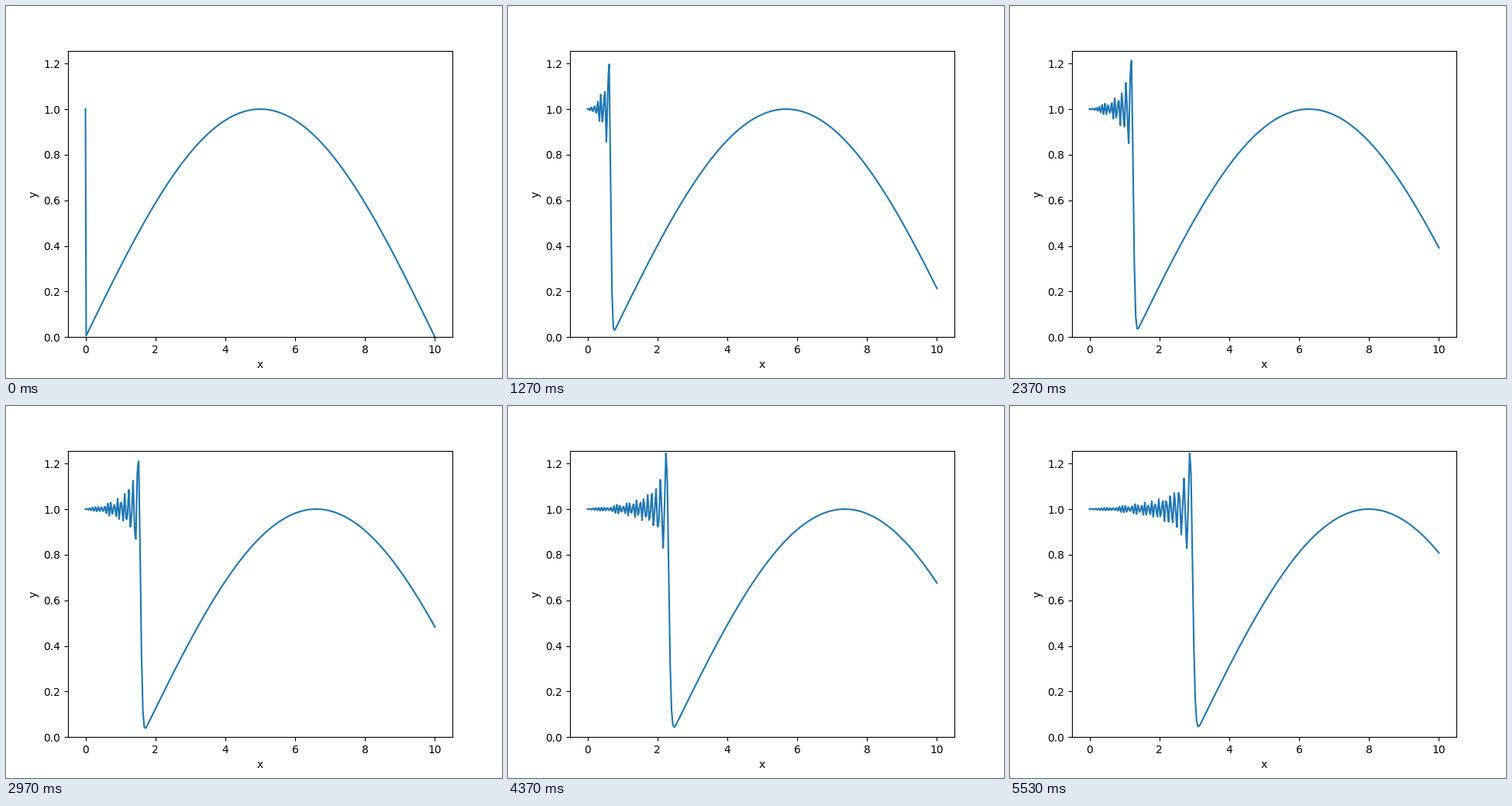
Animation of 640 by 480 pixels, one loop 5560 ms. Source, as a matplotlib script:

```python
import matplotlib.pyplot as plt
import numpy as np
from matplotlib.animation import FuncAnimation

# Linear advection u_t + u_x = 0, solved with the leapfrog scheme
LENGTH = 10
POINTS = 500
COURANT = 0.9
T_END = 3
LOOP_MS = 5560

x = np.linspace(0, LENGTH, POINTS)
dt = COURANT * (x[1] - x[0])
steps = int(T_END / dt)


def advance(base, u, c):
    """Step on from base with the central slope of u, inflow 1, upwind outflow."""
    new = np.empty_like(u)
    new[0] = 1
    new[1:-1] = base[1:-1] - c * (u[2:] - u[:-2])
    new[-1] = u[-1] - COURANT * (u[-1] - u[-2])
    return new


def solve():
    u = np.sin(np.pi * x / LENGTH)
    u[0] = 1
    # A forward Euler step starts the two-level scheme
    history = [u, advance(u, u, COURANT / 2)]
    while len(history) <= steps:
        history.append(advance(*history[-2:], COURANT))
    return np.array(history)


waves = solve()

fig, ax = plt.subplots(figsize=(6.4, 4.8), dpi=100)
(line,) = ax.plot(x, waves[0])
ax.set(xlabel="x", ylabel="y", ylim=(0, waves.max()))


def draw(i):
    line.set_ydata(waves[i])
    return (line,)


anim = FuncAnimation(fig, draw, frames=len(waves),
                     interval=LOOP_MS / len(waves), repeat=True, repeat_delay=0)
plt.show()
```
